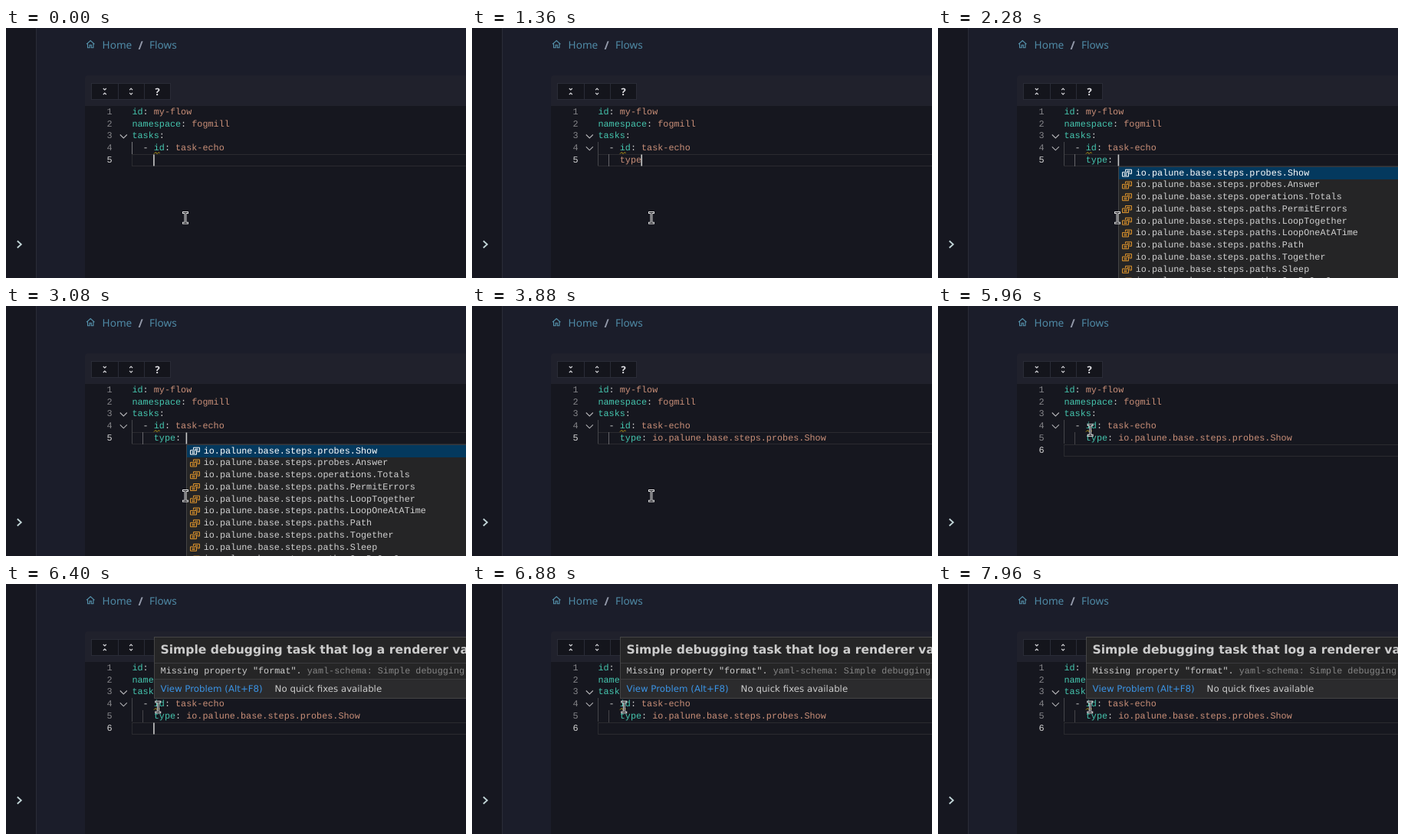
These frames come from a looping animation (600 px wide and 327 px high, 8000 ms). An HTML page with a canvas:

```html
<!DOCTYPE html>
<html lang="en">
<head>
<meta charset="utf-8">
<title>Flow editor</title>
<style>
  html, body { margin: 0; width: 100%; height: 100%; overflow: hidden; background: #16171f; }
  canvas { display: block; width: 600px; height: 327px; }
</style>
</head>
<body>
<canvas id="stage"></canvas>
<script>
const LOOP = 8000, BLINK = 520;
const CHAR = 7.08, LINE = 15.77, CODE_X = 164.4, CODE_Y = 112.9;
const MONO = '11.8px "Liberation Mono", monospace';
const SANS = '"DejaVu Sans", sans-serif';
const TEAL = '#45c5ae', STRING = '#c98f78', PLAIN = '#d0d0d0';

const PACKAGE = 'io.palune.base.steps.';
const FIRST_TASK = PACKAGE + 'probes.Show';
const suggestions = ['probes.Show', 'probes.Answer', 'operations.Totals', 'paths.PermitErrors',
  'paths.LoopTogether', 'paths.LoopOneAtATime', 'paths.Path', 'paths.Together',
  'paths.Sleep', 'paths.OneByOneGo'].map(name => PACKAGE + name);

// Each edit: time, key text, colon, value
const edits = [
  [0, ''], [40, 't'], [120, 'ty'], [200, 'typ'], [320, 'type'],
  [1560, 'type', ':'], [2040, 'type', ': '], [3360, 'type', ': ', FIRST_TASK],
  [4080, 'type', ': ', FIRST_TASK]
];
const LIST_SHOWN = 2080, ACCEPTED = 3360, NEW_LINE = 4080, HOVER = 6200, FOLD = 1360;
const pointer = [[0, 234, 248.3], [5120, 234, 248.3], [5320, 210.7, 215.3], [5600, 202, 181],
  [5920, 199, 164], [6000, 198.3, 161], [LOOP, 198.3, 161]];

const canvas = document.getElementById('stage');
const ratio = window.devicePixelRatio || 1;
canvas.width = 600 * ratio;
canvas.height = 327 * ratio;
const ctx = canvas.getContext('2d');
ctx.scale(ratio, ratio);

function box(x, y, w, h, color) {
  ctx.fillStyle = color;
  ctx.fillRect(x, y, w, h);
}

function frame(x, y, w, h, color) {
  ctx.strokeStyle = color;
  ctx.lineWidth = 1;
  ctx.strokeRect(x + .5, y + .5, w - 1, h - 1);
}

function stroke(path, color, width = 1.2) {
  ctx.strokeStyle = color;
  ctx.lineWidth = width;
  ctx.stroke(new Path2D(path));
}

function text(str, x, y, color, font = MONO) {
  ctx.font = font;
  ctx.textRendering = 'geometricPrecision';
  ctx.fillStyle = color;
  ctx.fillText(str, x, y);
}

// Writes [text, color] parts side by side on the character grid.
function codeLine(row, column, ...parts) {
  for (const [str, color] of parts) {
    text(str, CODE_X + column * CHAR, CODE_Y + row * LINE, color);
    column += str.length;
  }
}

function drawPage() {
  box(0, 0, 600, 327, '#1b1d2a');
  box(0, 0, 39, 327, '#161720');
  box(39, 0, 1, 327, '#2a2c38');
  stroke('M14.8 278.5l5 4.5-5 4.5', '#c3d6d8', 1.8);

  stroke('M105 21.2l5.2-4.7 5.2 4.7M106.5 20.5v5.2h2.6v-3.4h2.2v3.4h2.6v-5.2', '#5795af', 1.1);
  const crumb = '13.6px "Noto Sans", sans-serif';
  text('Home', 125.6, 27, '#4f8aa6', crumb);
  text('/', 172.5, 28, '#949aaa', 'bold 15px "Noto Sans", sans-serif');
  text('Flows', 187, 27, '#4f8aa6', crumb);

  ctx.fillStyle = '#20212c';
  ctx.beginPath();
  ctx.roundRect(103, 62, 510, 60, 4);
  ctx.fill();
  box(103, 102, 497, 225, '#16171f');
  box(111, 72, 104, 22, '#14151c');
  frame(111, 72, 36, 22, '#2a2c37');
  frame(146, 72, 35, 22, '#2a2c37');
  frame(180, 72, 35, 22, '#2a2c37');
  stroke('M126.8 79l2 2 2-2M126.8 87l2-2 2 2', '#d8d8dc');
  stroke('M161.1 81.2l2-2 2 2M161.1 84.8l2 2 2-2', '#d8d8dc');
  text('?', 194.6, 87.5, '#e4e4e8', 'bold 13px "Noto Sans", sans-serif');
}

function drawEditor(t, edit) {
  const [since, key, colon = '', value = ''] = edit;
  const activeRow = t >= NEW_LINE ? 5 : 4;
  const top = 165 + (activeRow - 4) * 16;
  frame(164, top, 440, 16, '#2b2b30');

  for (let row = 0; row <= activeRow; row++)
    text(row + 1, 131.6, CODE_Y + row * LINE, row === activeRow ? '#d6d6d6' : '#858589');
  const chevron = y => stroke(`M148.8 ${y}l4.5 4.5 4.5-4.5`, '#b5b5b8', 1.1);
  chevron(139.5);
  if (t >= FOLD) chevron(155.3);

  box(164, 149, 1, key ? 31 : 16, key ? '#45454a' : '#77777b');
  if (key) box(178, 165, 1, 16, t < NEW_LINE ? '#66666a' : '#45454a');

  codeLine(0, 0, ['id', TEAL], [': ', PLAIN], ['my-flow', STRING]);
  codeLine(1, 0, ['namespace', TEAL], [': ', PLAIN], ['fogmill', STRING]);
  codeLine(2, 0, ['tasks', TEAL], [':', PLAIN]);
  codeLine(3, 2, ['- ', PLAIN], ['id', TEAL], [': ', PLAIN], ['task-echo', STRING]);
  codeLine(4, 4, [key, colon ? TEAL : STRING], [colon, PLAIN], [value, STRING]);
  stroke('M193 164.5l2-2 2.2 2 2-2 1.5 1.5', '#bd9b14', 1);

  const column = activeRow === 5 ? 4 : 4 + (key + colon + value).length;
  if (Math.floor((t - since) / BLINK) % 2 === 0)
    box(CODE_X + column * CHAR - .6, top + .5, 1.6, 15, '#c9c9c9');
}

function drawSuggestions() {
  box(235, 181, 365, 146, '#252526');
  box(235, 181, 1, 146, '#454545');
  box(235, 181, 365, 1, '#353a40');
  box(236, 182, 364, 16, '#04395e');
  suggestions.forEach((name, i) => {
    const y = 189.3 + i * LINE;
    const color = i ? '#e0952c' : '#ffffff';
    ctx.save();
    ctx.translate(240, y - 4.6);
    stroke('M4.5 3V.5h8v5.5h-3M.5 4h8v5.5h-8zM2.5 6h4M2.5 7.7h4M6.5 2.5h4M9.5 4.3h1.5', color, 1);
    ctx.restore();
    text(name, 257.7, y + 3.2, i ? '#d0d0d0' : '#ffffff');
  });
}

function drawHover(opacity) {
  ctx.globalAlpha = opacity;
  box(193, 69, 407, 81, '#252526');
  box(194, 125, 406, 24, '#2b2b2d');
  box(193, 69, 1, 81, '#454545');
  for (const y of [69, 149]) box(193, y, 407, 1, '#454545');
  for (const y of [103, 124]) box(194, y, 406, 1, '#3b3b3d');
  text('Simple debugging task that log a renderer value.', 201.5, 90.6, '#cccccc', 'bold 15.6px ' + SANS);
  text('Missing property "format".', 201.6, 117, '#cccccc');
  text('yaml-schema: Simple debugging task', 201.6 + 27 * CHAR, 117, '#858585');
  text('View Problem (Alt+F8)', 201.6, 141.2, '#3b94e6', '11.8px ' + SANS);
  text('No quick fixes available', 350.6, 141.2, '#cccccc', '11.8px ' + SANS);
  ctx.globalAlpha = 1;
}

function drawPointer(t) {
  const i = pointer.findIndex(p => p[0] > t);
  const [t0, x0, y0] = pointer[i - 1], [t1, x1, y1] = pointer[i];
  const k = (t - t0) / (t1 - t0);
  ctx.save();
  ctx.translate(x0 + (x1 - x0) * k, y0 + (y1 - y0) * k);
  const beam = 'M-2.5-6.8h5M0-6.8v13.6M-2.5 6.8h5';
  ctx.lineCap = 'square';
  stroke(beam, '#f2f2f2', 2.8);
  stroke(beam, '#15151a', 1);
  ctx.restore();
}

function draw(now) {
  const t = now % LOOP;
  drawPage();
  drawEditor(t, edits.findLast(edit => edit[0] <= t));
  if (t >= LIST_SHOWN && t < ACCEPTED) drawSuggestions();
  if (t >= HOVER) drawHover(Math.min(1, (t - HOVER + 40) / 120));
  drawPointer(t);
}

function tick() {
  draw(performance.now());
  requestAnimationFrame(tick);
}
tick();
</script>
</body>
</html>
```
